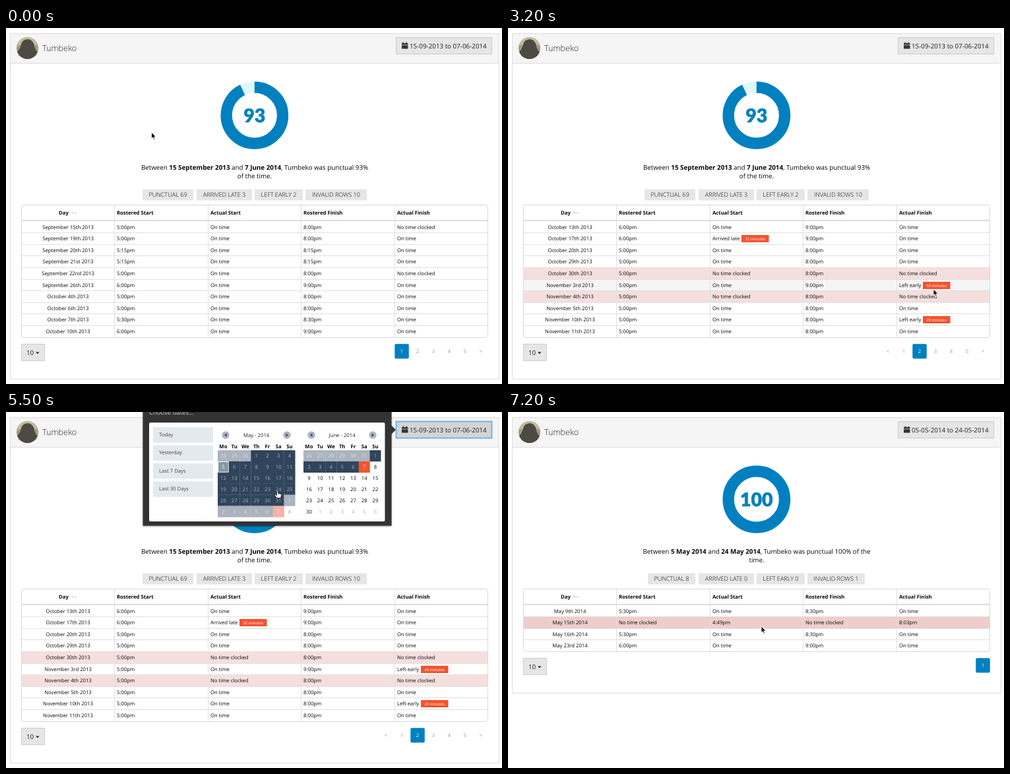
Recreate the animation shown at these times as an HTML page. Size 752 px wide and 540 px high, loop 7300 ms.

```html
<!DOCTYPE html>
<html lang="en">
<head>
<meta charset="utf-8">
<title>Punctuality report</title>
<style>
html, body { margin: 0; width: 100%; height: 100%; overflow: hidden; background: #fff; }
svg { display: block; font: 7.73px "Open Sans", sans-serif; text-rendering: geometricPrecision; }
</style>
</head>
<body>
<svg id="stage" width="752" height="540" viewBox="0 0 752 540"></svg>
<script>
const LOOP = 7300;
const PAGE_TWO = 2000, OPEN = 4200, FIRST_DAY = 5200, FILTER = 5600, BLUR = 6500, CLOSE = 6700;
const BLUE = '#0080bf', ORANGE = '#f5532d', NAVY = '#30455c', BUTTON = '#e6e6e6', INK = '#080808';
const PERSON = 'Tumbeko';
const stage = document.getElementById('stage');

// Pointer path: time, x, y
const path = [[0, 220.5, 158], [150, 220.5, 158], [800, 601, 486], [1050, 619.5, 491], [2100, 619.5, 491],
  [2600, 644, 399], [3200, 645, 396], [3900, 622, 37.5], [4300, 622, 37.5], [4950, 329, 83],
  [5250, 329, 83], [5480, 411.5, 119], [5750, 411.5, 119], [6400, 465, 406], [6700, 465, 406], [7150, 384, 325]];

// Rows: day, rostered start, rostered finish, actual start, actual finish; "!" marks an invalid row
const parseRows = (year, text) => text.trim().split('\n').map(line => {
  const [day, start, finish, arrived, left] = line.replace('!', '').split(',');
  const clock = s => /^\d/.test(s) ? s + 'pm' : s;
  return { bad: line[0] === '!',
    cells: [`${day} ${year}`, clock(start), clock(arrived || 'On time'), clock(finish), clock(left || 'On time')] };
});
const NONE = 'No time clocked';
const views = [
  { rows: parseRows(2013, `September 15th,5:00,8:00,,${NONE}
September 19th,5:00,8:00
September 20th,5:15,8:15
September 21st,5:15,8:15
September 22nd,5:00,8:00,,${NONE}
September 26th,6:00,9:00
October 4th,5:00,8:00
October 6th,5:00,8:00
October 7th,5:30,8:30
October 10th,6:00,9:00`), pages: '12345>', active: '1' },
  { rows: parseRows(2013, `October 13th,6:00,9:00
October 17th,6:00,9:00,Arrived late|32
October 20th,5:00,8:00
October 29th,5:00,8:00
!October 30th,5:00,8:00,${NONE},${NONE}
November 3rd,5:00,9:00,,Left early|43
!November 4th,5:00,8:00,${NONE},${NONE}
November 5th,5:00,8:00
November 10th,5:00,8:00,,Left early|29
November 11th,5:00,8:00`), pages: '<12345>', active: '2' },
  { rows: parseRows(2014, `May 9th,5:30,8:30
!May 15th,${NONE},${NONE},4:49,8:03
May 16th,5:30,8:30
May 23rd,6:00,9:00`), pages: '1', active: '1' }
];

const esc = s => s.replace('<', '&lt;').replace('>', '&gt;');
const rect = (x, y, w, h, fill, more = '') =>
  `<rect x="${x}" y="${y}" width="${w}" height="${h}" fill="${fill}" ${more}/>`;
const text = (x, y, s, fill = INK, more = '') => `<text x="${x}" y="${y}" fill="${fill}" ${more}>${s}</text>`;
const shape = (d, fill, more = '') => `<path d="${d}" fill="${fill}" ${more}/>`;
const line = (x1, y1, x2, y2) => shape(`M${x1} ${y1}L${x2} ${y2}`, 'none', 'stroke="#e0e0e0"');
const MID = 'text-anchor="middle"', BIG = 'font-size="9.8"', BOLD = 'font-weight="700"';

function pointerAt(t) {
  const i = path.findIndex(p => p[0] > t);
  if (i < 0) return path.at(-1).slice(1);
  const [a, b] = [path[i - 1], path[i]];
  const u = (t - a[0]) / (b[0] - a[0]), e = u * u * (3 - 2 * u);
  return [a[1] + (b[1] - a[1]) * e, a[2] + (b[2] - a[2]) * e];
}

function header(filtered, hover, focus) {
  const border = focus ? 'stroke="#72b4e8" stroke-width="2"' : `stroke="${hover ? '#b3b3b3' : '#ccc'}"`;
  return rect(6.5, 8.5, 741, 45, '#f5f5f5', 'stroke="#ddd"') +
    '<clipPath id="round"><circle cx="32.5" cy="30.5" r="16.5"/></clipPath><g clip-path="url(#round)">' +
    rect(16, 14, 33, 33, '#a29b80') + rect(16, 14, 33, 12, '#c3b99c') +
    shape('M16 48V37Q20 34 22 28Q24 17 33 17Q42 18 43 28Q45 35 49 37V48Z', '#4d4943') + '</g>' +
    text(55, 35, PERSON, '#222', 'font-size="12.6" font-weight="300"') +
    rect(591.5, 14.5, 145, 25, hover || focus ? '#d4d4d4' : BUTTON, border) +
    shape('M600 23h1.5v-1.500h1.500v1.500h3.500v-1.500h1.500v1.500h1.500v2.500h-9.500zM600 26.300h9.500v5.200h-9.500z', '#333') +
    text(612, 31, filtered ? '05-05-2014 to 24-05-2014' : '15-09-2013 to 07-06-2014', '#222', BIG);
}

function summary(filtered) {
  const ring = (color, more = '') =>
    `<circle cx="376.800" cy="132.500" r="42.700" fill="none" stroke="${color}" stroke-width="17.300" ${more}/>`;
  const bold = s => `<tspan ${BOLD}>${s}</tspan>`;
  const [from, to, tail, last] = filtered
    ? ['5 May 2014', '24 May 2014', '100% of the', 'time.']
    : ['15 September 2013', '7 June 2014', '93%', 'of the time.'];
  const chips = filtered
    ? [['PUNCTUAL 8', 212, 284], ['ARRIVED LATE 0', 289, 373], ['LEFT EARLY 0', 377, 450], ['INVALID ROWS 1', 454, 541]]
    : [['PUNCTUAL 69', 207, 284], ['ARRIVED LATE 3', 289, 373], ['LEFT EARLY 2', 377, 450], ['INVALID ROWS 10', 454, 547]];
  return ring(filtered ? BLUE : '#e0f7fe') +
    (filtered ? '' : ring(BLUE, 'pathLength="100" stroke-dasharray="93 7" transform="rotate(-90 376.800 132.500)"')) +
    text(376.8, 143, filtered ? '100' : '93', BLUE,
      `${MID} stroke="${BLUE}" stroke-width=".5" style="font:900 28.500px Lato,sans-serif"`) +
    text(377, 214.5, `Between ${bold(from)} and ${bold(to)}, ${PERSON} was punctual ${tail}`, INK, `${MID} ${BIG}`) +
    text(377, 228, last, INK, `${MID} ${BIG}`) +
    chips.map(([s, a, b]) => rect(a, 244.5, b - a, 17, BUTTON) +
      text((a + b) / 2, 256.3, s, INK, `${MID} font-size="9.1" font-weight="300"`)).join('');
}

const colX = i => Math.round(23 + 141.4 * i) + .5;
const rowY = i => Math.round(292.5 + 17.6 * i);

function table(rows, [px, py]) {
  const bottom = rowY(rows.length) + .5;
  let out = '';
  rows.forEach(({ bad, cells }, i) => {
    const y = rowY(i), h = rowY(i + 1) - y;
    const hover = px > 23 && px < 730 && py >= y && py < y + h;
    const fill = bad ? (hover ? '#eecdca' : '#f5dfde') : hover ? '#f5f5f5' : '#fff';
    out += rect(23, y, 707, h, fill);
    if (i) out += line(23, y + .5, 730, y + .5);
    cells.forEach((cell, c) => {
      const [label, late] = cell.split('|');
      const x = c ? colX(c) + 3.5 : 94;
      out += text(x, y + 11.6, label, INK, c ? '' : MID);
      if (!late) return;
      const bx = x + (label[0] === 'A' ? 44 : 36);
      out += rect(bx, y + 4, 41.5, 11, ORANGE) + text(bx + 20.8, y + 11.7, late + ' minutes', '#fff', `${MID} font-size="5.9"`);
    });
  });
  ['Day', 'Rostered Start', 'Actual Start', 'Rostered Finish', 'Actual Finish'].forEach((s, c) => {
    out += text(c ? colX(c) + 3.5 : 80, c ? 283 : 282.5, s, INK, BOLD);
    if (c) out += line(colX(c), 269, colX(c), bottom);
  });
  return out + shape('M98.500 279h4l-2 2.500zM103.500 281.500h4l-2-2.500z', '#ccc') +
    rect(23, 291, 707, 2, '#ddd') +
    rect(23.5, 268.5, 707, bottom - 268.5, 'none', 'rx="3" stroke="#d8d8d8"');
}

function footer({ pages, active }, top, [px, py]) {
  let out = rect(23.5, top + .5, 35, 25, BUTTON, 'stroke="#ccc"') + text(31, top + 16.8, '10', '#222', BIG) +
    shape(`M45 ${top + 12.5}h5.500l-2.750 3z`, '#222');
  let hand = false;
  [...pages].forEach((s, i) => {
    const x = 720 - 24 * (pages.length - 1 - i);
    const hover = Math.abs(px - x) < 11 && py > top && py < top + 23;
    hand ||= hover;
    const on = s === active;
    if (on || hover) out += rect(x - 10.7, top + .3, 21.5, 22.2, on ? BLUE : '#eee', 'rx="2"');
    out += text(x, top + 14, esc(s), on ? '#fff' : hover ? BLUE : '#999', MID);
  });
  return [out, hand];
}

const DAY = 864e5, utc = (month, day) => Date.UTC(2014, month - 1, day);

function month(left, title, number, first, filtered, focused) {
  const mid = left + 58.6;
  let out = text(mid, 38, title, '#222', MID);
  [[left + 12, 1], [left + 105, -1]].forEach(([x, dir]) => {
    out += `<circle cx="${x}" cy="35" r="5.700" fill="#abb5c0"/>` +
      shape(`M${x - 2 * dir} 35l${3.5 * dir} -2.500v5z`, NAVY);
  });
  ['Mo', 'Tu', 'We', 'Th', 'Fr', 'Sa', 'Su'].forEach((s, i) =>
    out += text(left + 8.4 + 16.75 * i, 55, s, INK, `${MID} ${BOLD}`));
  const from = filtered ? utc(5, 5) : utc(4, 1), to = filtered ? utc(5, 24) : utc(6, 7);
  for (let i = 0; i < 42; i++) {
    const day = first + i * DAY, date = new Date(day);
    const inside = date.getUTCMonth() + 1 === number;
    const x = left + 16.75 * (i % 7), y = 58 + 16.9 * Math.floor(i / 7);
    const picked = focused && inside && day === utc(5, 5);
    let fill, ink = inside ? INK : '#aaa';
    if (day >= from && day <= to) {
      const end = day === from || day === to;
      fill = end ? (inside ? ORANGE : '#f8b0a2') : picked ? '#8796a5' : inside ? NAVY : '#abb4be';
      ink = end || picked ? '#fff' : inside ? '#a3afbb' : '#d8dde2';
      // Slight overlap hides the seams between days
      out += rect(x, y, 17, 17.1, fill);
      if (picked) out += rect(x + .5, y + .5, 15.8, 15.8, 'none', 'stroke="#fff"');
    }
    out += text(x + 8.4, y + 11.3, date.getUTCDate(), ink, MID);
  }
  return out;
}

function picker(filtered, focused) {
  return rect(207.5, -10, 377, 182.5, '#333', 'style="filter:drop-shadow(0 1px 1px #0006)"') +
    shape('M584 20l7 7-7 7z', '#333') +
    text(217, 3.5, 'Choose dates...', '#ccc', 'font-size="9.5"') +
    rect(217, 16, 357.5, 150, '#fff', 'rx="2"') +
    ['Today', 'Yesterday', 'Last 7 Days', 'Last 30 Days'].map((s, i) =>
      rect(223, 23 + 27.4 * i, 91, 23.5, '#e4e9ee') + text(232, 37 + 27.4 * i, s, '#444')).join('') +
    month(321, 'May - 2014', 5, utc(4, 28), filtered, focused) +
    month(451, 'June - 2014', 6, utc(5, 26), filtered, false);
}

function pointer([x, y], hand) {
  const [d, fill, stroke] = hand
    ? ['M-1.200 1Q0-.8 1.200 1V4.500L5 5.300Q6.300 5.800 6 7.800L5 11.500H-.8L-4 7.500Q-4.300 5.700-2.800 6.200L-1.200 7.500Z', '#fff', '#111']
    : ['M0 0V9.800L2.200 7.800 3.800 11.300 5.300 10.600 3.800 7.200H6.900Z', '#000', '#fff'];
  return shape(d, fill, `stroke="${stroke}" stroke-width=".9" transform="translate(${x.toFixed(1)} ${y.toFixed(1)})"`);
}

function render(t) {
  const at = pointerAt(t), [x, y] = at;
  const filtered = t >= FILTER, open = t >= OPEN && t < CLOSE;
  const view = views[filtered ? 2 : t >= PAGE_TWO ? 1 : 0];
  const bottom = rowY(view.rows.length);
  const onButton = x > 591 && x < 737 && y > 14 && y < 40;
  const onDay = open && x > 321 && x < 568 && y > 58 && y < 160;
  const [foot, onPage] = footer(view, bottom + 10, at);
  return rect(6.5, 8.5, 741, bottom + 55, '#fff', 'stroke="#ddd"') +
    header(filtered, onButton, t >= OPEN - 100 && t < BLUR) +
    summary(filtered) + table(view.rows, at) + foot +
    (open ? picker(filtered, t >= FIRST_DAY && !filtered) : '') +
    pointer(at, onButton || onDay || onPage);
}

let shown;
function tick(now) {
  const markup = render(now % LOOP);
  if (markup !== shown) stage.innerHTML = shown = markup;
  requestAnimationFrame(tick);
}
tick(performance.now());
</script>
</body>
</html>
```
